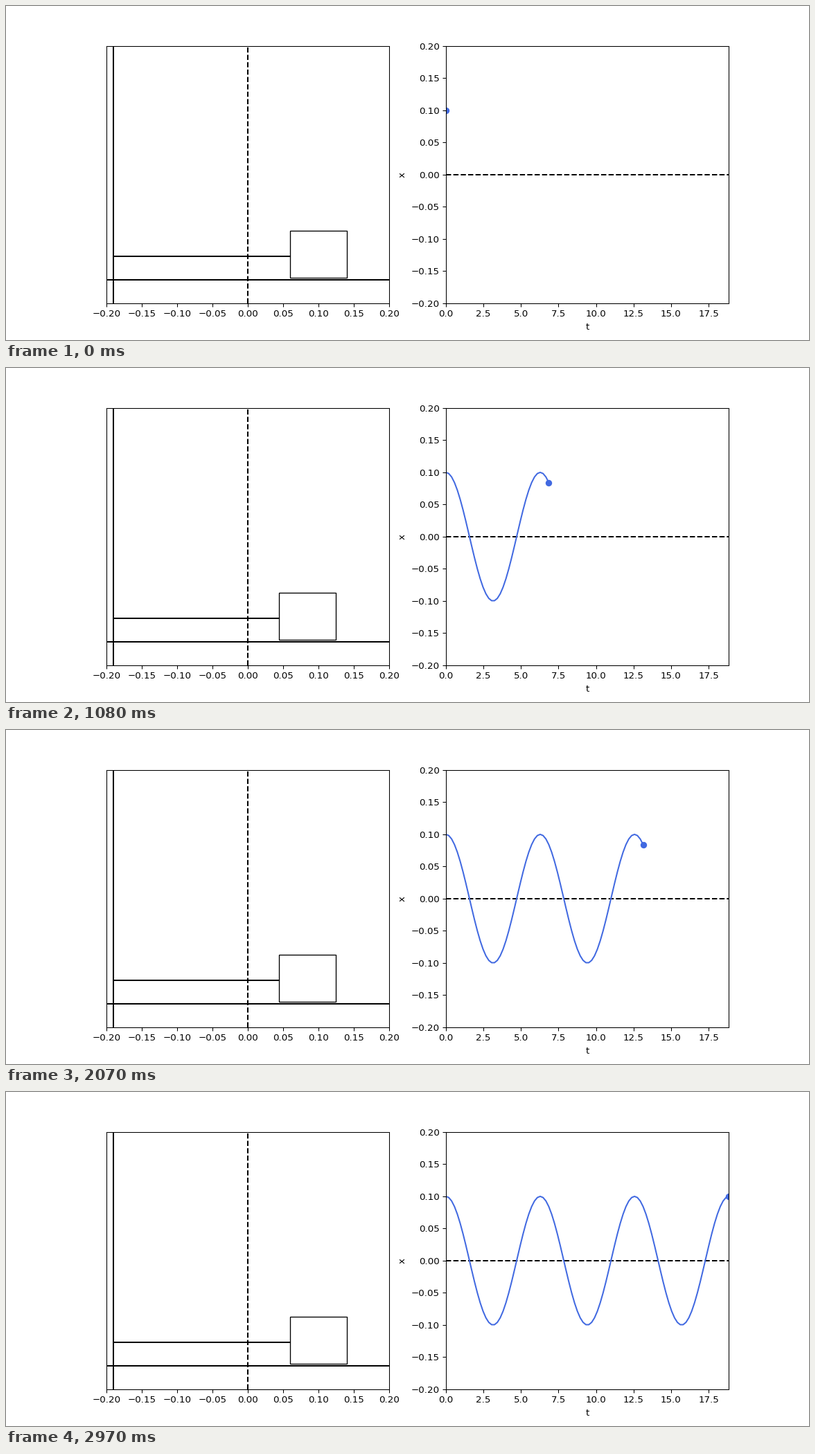
Recreate the animation shown at these times as a matplotlib script. Size 1159 by 483 pixels, loop 3000 ms.

```python
import numpy as np
import matplotlib.pyplot as plt
from matplotlib.animation import FuncAnimation

# 12 x 5 inches at this density fill 1159 x 483 whole pixels.
SIZE, DPI = (12, 5), 96.601
FRAMES, INTERVAL = 100, 30
AMPLITUDE = 0.1
WALL = -0.19
BOX_W, BOX_H = 0.08, 0.2

plt.rcParams["font.family"] = "DejaVu Sans"

t = np.linspace(0, 6 * np.pi, FRAMES)
x = AMPLITUDE * np.cos(t)

fig, (scene, graph) = plt.subplots(1, 2, figsize=SIZE, dpi=DPI)

# Mass on a spring
scene.set_xlim(-0.2, 0.2)
scene.set_ylim(-0.1, 1)
scene.set_yticks([])
scene.axvline(0, color="black", linestyle="--")
scene.axvline(WALL, color="black")
scene.axhline(0, color="black")
spring, = scene.plot([], [], color="black")
box = plt.Rectangle((0, 0.01), BOX_W, BOX_H, fill=False, edgecolor="black")
scene.add_patch(box)

# Displacement over time
graph.set_xlim(0, t[-1])
graph.set_ylim(-0.2, 0.2)
graph.set_xlabel("t")
graph.set_ylabel("x")
graph.axhline(0, color="black", linestyle="--")
curve, = graph.plot([], [], color="royalblue")
dot, = graph.plot([], [], "o", color="royalblue")


def update(i):
    left = x[i] - BOX_W / 2
    box.set_x(left)
    spring.set_data([WALL, left], [0.1, 0.1])
    curve.set_data(t[:i + 1], x[:i + 1])
    dot.set_data([t[i]], [x[i]])
    return spring, box, curve, dot


anim = FuncAnimation(fig, update, frames=FRAMES, interval=INTERVAL,
                     repeat=True, repeat_delay=0)
plt.show()
```
